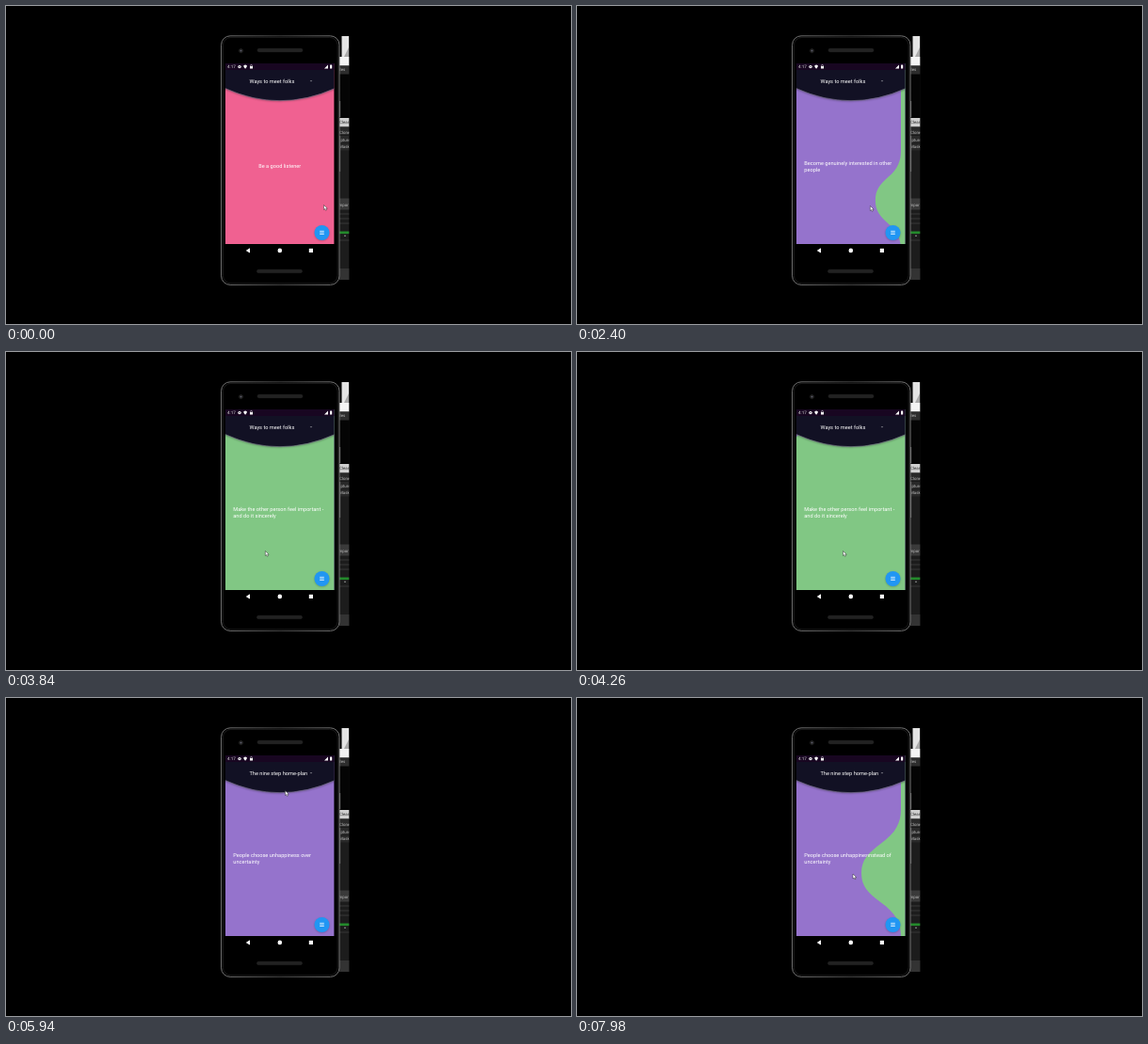
An HTML page for the animation above (8 s loop, 600 by 338 pixels).

```html
<!DOCTYPE html>
<html lang="en">
<head>
<meta charset="utf-8">
<title>Liquid swipe</title>
<style>
  html, body { margin: 0; width: 100%; height: 100%; overflow: hidden; background: #000; }
  svg { display: block; width: 100%; height: 100%; }
  text { font: 5.65px Roboto, sans-serif; fill: #fff; text-rendering: geometricPrecision; }
  .tiny { font-size: 4.6px; fill: #ddd; }
  .side text { font-size: 4.4px; fill: #bbb; }
</style>
</head>
<body>
<svg viewBox="0 0 600 338">
  <defs>
    <clipPath id="screen"><rect x="233" y="61" width="115.4" height="192"/></clipPath>
    <clipPath id="strip"><rect x="354" y="32" width="10.3" height="259"/></clipPath>
    <clipPath id="waveClip"><path id="wave"/></clipPath>
    <linearGradient id="rim" x1="0" x2="1">
      <stop offset="0" stop-color="#777"/><stop offset=".5" stop-color="#444"/><stop offset="1" stop-color="#777"/>
    </linearGradient>
    <filter id="soft" x="-30%" y="-30%" width="160%" height="160%"><feGaussianBlur stdDeviation=".8"/></filter>
  </defs>
  <rect width="600" height="338"/>

  <g class="side" clip-path="url(#strip)">
    <rect x="354" y="54" width="11" height="237" fill="#1c1c1c"/>
    <rect x="354" y="72" width="11" height="47" fill="#040404"/>
    <rect x="356.5" y="32" width="8" height="22" fill="#e4e4e4"/>
    <path d="M359 54l5-10v10z" fill="#aaa"/>
    <rect x="354" y="54" width="11" height="9.5" fill="#f4f4f4"/>
    <rect x="354" y="63.5" width="11" height="9" fill="#2d2d2d"/>
    <text x="353.5" y="69">iles</text>
    <rect x="354" y="119" width="11" height="9.5" fill="#d0d0d0"/>
    <text x="354" y="125.4" style="fill:#222">Clean</text>
    <rect x="354" y="128.5" width="11" height="25" fill="#292929"/>
    <path d="M354 137.5h11M354 146h11" stroke="#111" stroke-width=".6"/>
    <text x="354" y="135.5">Clone r</text>
    <text x="353" y="143.6">apture</text>
    <text x="354" y="151.4">Mask</text>
    <rect x="354" y="204.5" width="11" height="12" fill="#3a3a3a"/>
    <text x="353.5" y="212.6">mpor</text>
    <path d="M354 221h11M354 226h11M354 231h11" stroke="#383838"/>
    <rect x="354" y="239.5" width="11" height="2.6" fill="#238a2b"/>
    <circle cx="360" cy="244.3" r=".8" fill="#aaa"/>
    <path d="M354 249h11" stroke="#444" stroke-width=".7"/>
    <rect x="354" y="279" width="11" height="12" fill="#333"/>
  </g>

  <path d="M354.5 101v17M354.5 138v38" stroke="#666" stroke-width="1.3"/>
  <rect x="228.6" y="31.8" width="125.4" height="264.6" rx="9.5" stroke="url(#rim)"/>
  <rect x="230.4" y="33.4" width="121.8" height="261.4" rx="8.5" fill="none" stroke="#222" stroke-width=".8"/>
  <g fill="#222" stroke="#2b2b2b" stroke-width=".5">
    <rect x="267" y="45.3" width="48" height="3.4" rx="1.7"/>
    <rect x="266.5" y="280.2" width="48" height="3.4" rx="1.7"/>
    <circle cx="249.5" cy="47.6" r="2.1"/>
  </g>
  <circle cx="249.5" cy="47.6" r=".8" fill="#667"/>

  <g clip-path="url(#screen)">
    <g id="current"></g>
    <g clip-path="url(#waveClip)" id="next"></g>
    <path d="M232 87.5Q291 114 350 87.5V61H232z" opacity=".35" filter="url(#soft)" transform="translate(0 .6)"/>
    <path d="M233 87.6Q291 113.6 349 87.6V61H233z" fill="#121124"/>
    <path d="M233 87.7Q291 113.7 349 87.7" fill="none" stroke="#77738a" stroke-width=".6"/>
    <rect x="233" y="61" width="116" height="7" fill="#180621"/>
    <circle cx="335.5" cy="241.7" r="7.8" opacity=".25" filter="url(#soft)"/>
    <circle cx="335.5" cy="241" r="8" fill="#2196f3"/>
    <path d="M333.2 239.3h4.6M333.2 240.9h4.6M333.2 242.5h4.6" stroke="#fff" stroke-width=".7"/>
  </g>
  <text class="tiny" x="235" y="66.3">4:17</text>
  <g fill="#fff">
    <circle cx="248" cy="64.6" r="1.7"/>
    <path d="M252.300 63.300l1.800-.8 1.800.8q0 2.600-1.800 3.400-1.800-.8-1.800-3.400z"/>
    <rect x="259" y="64" width="3" height="2.5"/>
    <path d="M342 62.500v4h-4z"/>
    <rect x="344" y="62.500" width="2.200" height="4.100" rx=".4"/>
    <path d="M322.700 79.300h2.600l-1.300 1.300z" opacity=".55"/>
    <path d="M259 257.300v5.200l-4.300-2.600z"/>
    <circle cx="290.800" cy="259.900" r="2.300"/>
    <rect x="321.800" y="257.800" width="4.200" height="4.200"/>
  </g>
  <circle cx="248" cy="64.6" r=".6" fill="#180621"/>
  <path d="M259.600 64v-.7a.9.9 0 0 1 1.800 0v.7" fill="none" stroke="#fff" stroke-width=".5"/>
  <text id="title" x="258.5" y="82"></text>
  <path id="cursor" d="M0 0v5l1.200-.9.8 1.700 1-.5-.8-1.600h1.600z" fill="#fff" stroke="#222" stroke-width=".45"/>
</svg>
<script>
const LOOP = 8000;
const PINK = '#f06191', PURPLE = '#9573cc', GREEN = '#81c784';
const el = id => document.getElementById(id);

const pages = {
  listen: [PINK, 'Be a good listener'],
  interest: [PURPLE, 'Become genuinely interested in other', 'people'],
  important: [GREEN, 'Make the other person feel important -', 'and do it sincerely'],
  choose: [PURPLE, 'People choose unhappiness over', 'uncertainty'],
  focus: [GREEN, 'Focus on being productive instead of', 'being busy']
};

const scenes = [
  { until: 1640, title: 'Ways to meet folks', from: 'listen', to: 'interest', centerY: 213 },
  { until: 5880, title: 'Ways to meet folks', from: 'interest', to: 'important', centerY: 206.5 },
  { until: LOOP, title: 'The nine step home-plan', from: 'choose', to: 'focus', centerY: 186 }
];

// [time, swipe progress]
const swipe = [
  [740, 0], [780, .05], [1060, .4], [1200, .6], [1400, 1], [1640, 1], [1641, 0],
  [2180, 0], [2220, .05], [2400, .225], [2640, .45], [2780, .62], [3000, 1],
  [4080, 1], [4400, .55], [4640, 0], [7620, 0], [7660, .05], [7980, .35]
];

// [time, x, y]
const pointer = [
  [0, 337.5, 211.5], [740, 337.5, 211.5], [1060, 285, 213.5], [1200, 284, 213.5], [1640, 284, 213.5],
  [2180, 341, 211.5], [2400, 311.5, 212.5], [2640, 277, 213], [3840, 275.5, 211.5], [4060, 250, 211.5],
  [4400, 305, 211.5], [4600, 312, 190], [4900, 296.5, 81.5], [5300, 296.5, 81.5], [5700, 296.5, 98.5],
  [6720, 296.5, 98.5], [7560, 341, 186.5], [7980, 293, 187]
];

const clamp = v => Math.max(0, Math.min(1, v));
const mix = (a, b, k) => a + (b - a) * k;

function sample(keys, t) {
  const i = keys.findIndex(k => k[0] > t);
  if (i === 0) return keys[0].slice(1);
  if (i < 0) return keys[keys.length - 1].slice(1);
  const a = keys[i - 1], b = keys[i];
  const k = (t - a[0]) / (b[0] - a[0]);
  return a.slice(1).map((v, n) => mix(v, b[n + 1], k));
}

function pageMarkup([color, ...lines]) {
  const single = lines.length === 1;
  const x = single ? 268.2 : 241.3, y = single ? 172.2 : 169.3;
  return `<rect x="233" y="61" width="116" height="192" fill="${color}"/>` +
    lines.map((s, i) => `<text x="${x}" y="${y + i * 6.5}">${s}</text>`).join('');
}

function wavePath(p, cy) {
  if (p <= 0) return 'M0 0';
  const side = 5 * clamp(p / .05) + 111 * clamp((p - .4) / .5);
  const bulge = Math.min(120 * p, 76);
  const reach = 26 + 120 * Math.min(p, .35) + 430 * Math.max(0, p - .35);
  const edge = 349 - side;
  const at = (h, v, dir) => `${edge - bulge * h} ${cy + dir * reach * (1 - v)} `;
  const mid = [.5, .535];
  return `M350 -400H${edge}L${at(0, 0, -1)}` +
    `C${at(0, .22, -1)}${at(.13, .37, -1)}${at(...mid, -1)}` +
    `C${at(.83, .69, -1)}${at(1, .79, -1)}${at(1, 1, -1)}` +
    `C${at(1, .79, 1)}${at(.83, .69, 1)}${at(...mid, 1)}` +
    `C${at(.13, .37, 1)}${at(0, .22, 1)}${at(0, 0, 1)}V900H350Z`;
}

let shown;
function showScene(scene) {
  if (scene === shown) return;
  shown = scene;
  el('title').textContent = scene.title;
  el('current').innerHTML = pageMarkup(pages[scene.from]);
  el('next').innerHTML = pageMarkup(pages[scene.to]);
}

const start = performance.now();
function draw() {
  const t = (performance.now() - start) % LOOP;
  const scene = scenes.find(s => t < s.until);
  showScene(scene);
  const [x, y] = sample(pointer, t);
  el('wave').setAttribute('d', wavePath(sample(swipe, t)[0], scene.centerY));
  el('cursor').setAttribute('transform', `translate(${x} ${y})`);
  requestAnimationFrame(draw);
}
draw();
</script>
</body>
</html>
```
